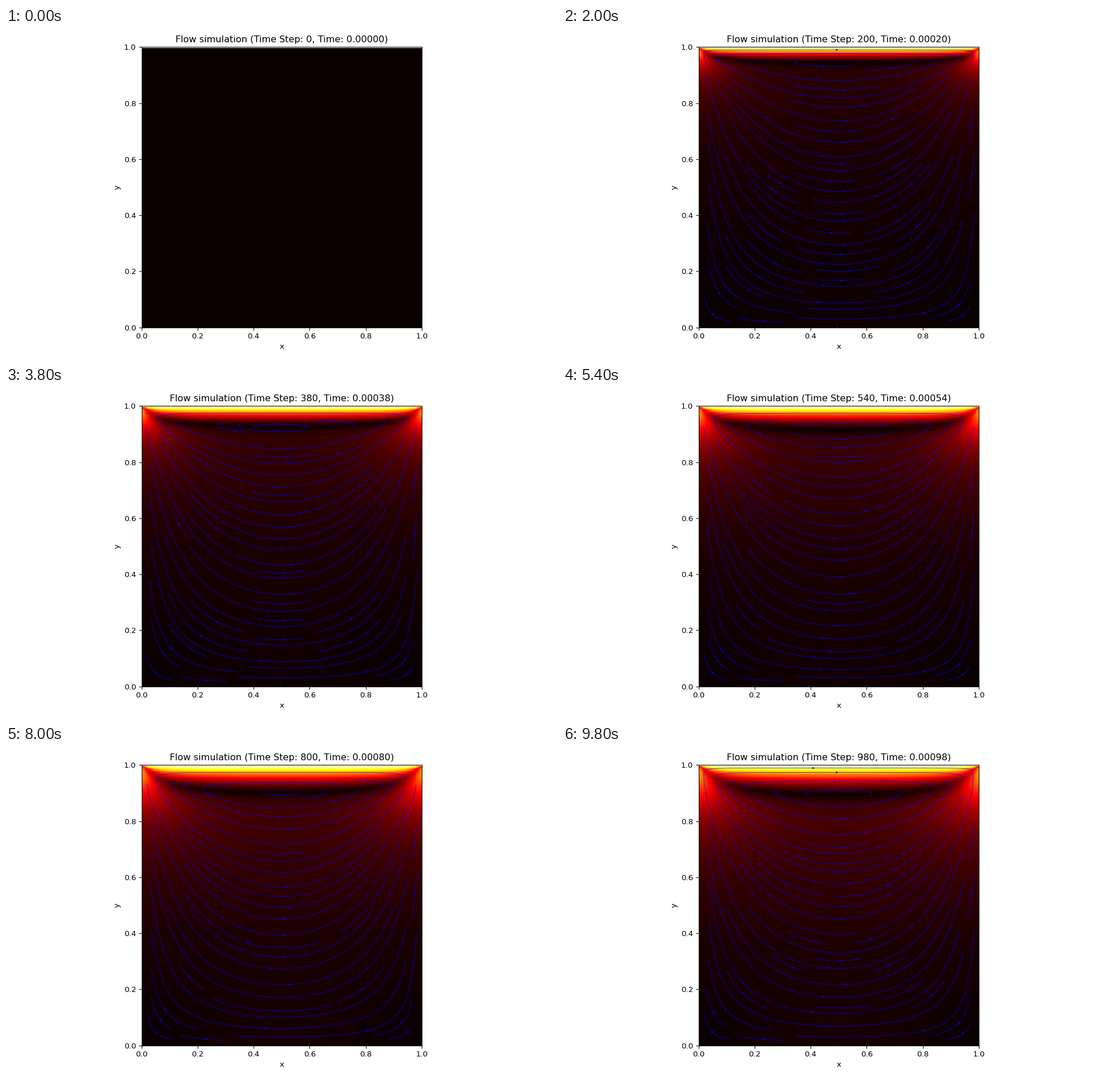
A matplotlib script that plays this animation: 966x580 px, repeating every 10000 ms.

```python
import numpy as np
import matplotlib.pyplot as plt
from matplotlib.animation import FuncAnimation

W, H, DPI = 966, 580, 96.6
FRAMES, INTERVAL = 50, 200
STEPS_PER_FRAME, DT = 20, 1e-6
N = 200            # cells per side of the cavity
NU, LID = 2.0, 1.0
SUBSTEPS = 10      # solver steps per frame

grid = np.linspace(0, 1, N + 1)
h = 1 / N

# Sine basis that diagonalises the discrete Laplacian
k = np.arange(1, N)
sine = np.sqrt(2 / N) * np.sin(np.pi * np.outer(k, k) / N)
eig = (2 - 2 * np.cos(np.pi * k / N)) / h**2
eig_sum = eig[:, None] + eig[None, :]


def solve_stream(vort):
    """Stream function on the inner nodes for a given vorticity."""
    return sine @ ((sine @ vort[1:-1, 1:-1] @ sine) / eig_sum) @ sine


def velocity(psi):
    """Velocity on all nodes; the side walls and the floor let fluid slip."""
    u = np.zeros_like(psi)
    v = np.zeros_like(psi)
    u[1:-1] = (psi[2:] - psi[:-2]) / (2 * h)
    u[0] = psi[1] / h
    u[-1] = LID
    v[:, 1:-1] = (psi[:, :-2] - psi[:, 2:]) / (2 * h)
    v[:, 0] = -psi[:, 1] / h
    v[:, -1] = psi[:, -2] / h
    return u, v


def simulate():
    """Velocity fields of the cavity flow, one per frame."""
    psi = np.zeros((N + 1, N + 1))
    vort = np.zeros_like(psi)
    fields = [velocity(psi)]
    r = NU * STEPS_PER_FRAME * DT / SUBSTEPS / h**2
    for _ in range(FRAMES - 1):
        for _ in range(SUBSTEPS):
            vort[-1] = -2 * (psi[-2] + LID * h) / h**2
            vort[1:-1, 1:-1] += r * (
                vort[2:, 1:-1] + vort[:-2, 1:-1]
                + vort[1:-1, 2:] + vort[1:-1, :-2]
                - 4 * vort[1:-1, 1:-1])
            psi[1:-1, 1:-1] = solve_stream(vort)
        fields.append(velocity(psi))
    return fields


fields = simulate()

plt.rcParams["font.family"] = "DejaVu Sans"
fig = plt.figure(figsize=(W / DPI, H / DPI), dpi=DPI)
ax = fig.add_axes([237.6 / W, 55.4 / H, 491.2 / W, 491.2 / H])


def draw(i):
    u, v = fields[i]
    step = i * STEPS_PER_FRAME
    ax.clear()
    ax.imshow(np.hypot(u, v), cmap="hot", vmin=0, vmax=LID, origin="lower",
              extent=(0, 1, 0, 1), interpolation="nearest", aspect="auto")
    # Streamlines keep off the lid itself
    inner = u.copy()
    inner[-1] = np.nan
    ax.streamplot(grid, grid, inner, v, color="blue", density=1,
                  linewidth=0.5, arrowsize=0.5)
    ax.set_xlim(0, 1)
    ax.set_ylim(0, 1)
    ax.set_xlabel("x")
    ax.set_ylabel("y")
    ax.set_title(f"Flow simulation (Time Step: {step}, Time: {step * DT:.5f})")
    return []


anim = FuncAnimation(fig, draw, frames=FRAMES, interval=INTERVAL,
                     init_func=lambda: [], repeat=True, repeat_delay=0)
plt.show()
```
